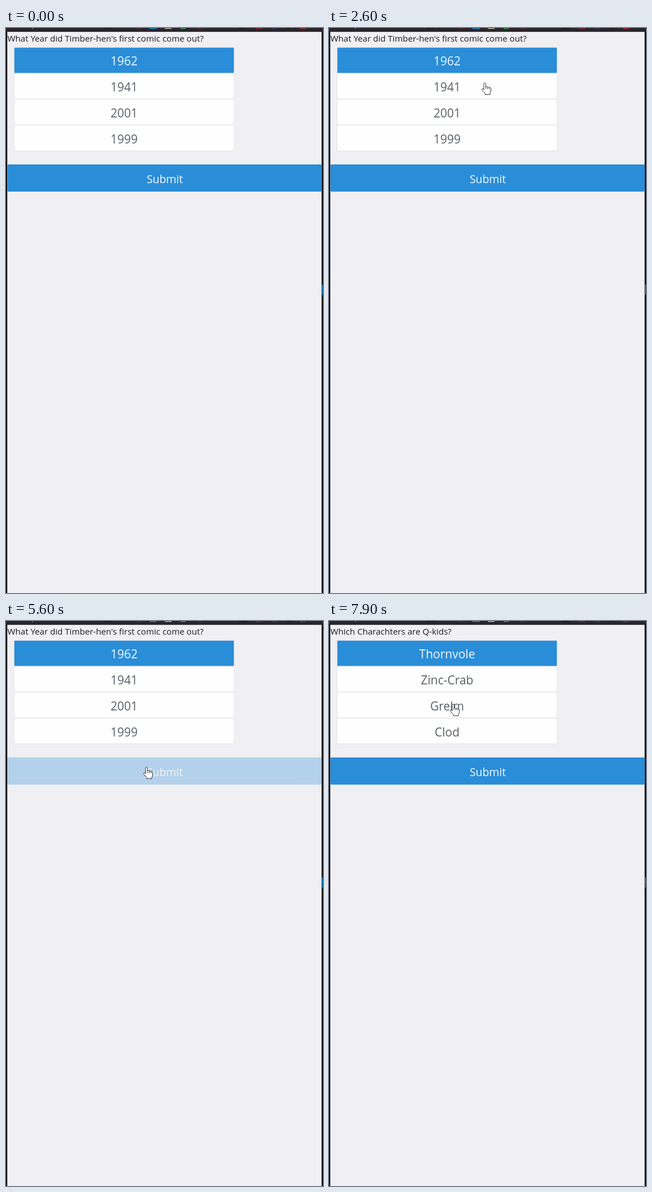
These frames come from a looping animation (561x998 px, 8000 ms). An HTML page:

```html
<!DOCTYPE html>
<html lang="en">
<head>
<meta charset="utf-8">
<title>Quiz</title>
<style>
  html, body { margin: 0; width: 100%; height: 100%; overflow: hidden; background: #f0eff3; }
  svg { display: block; width: 100vw; height: 100vh; }
  text { font-family: "Open Sans", "Noto Sans", sans-serif; }
  .answer { font-size: 21px; text-anchor: middle; }
</style>
</head>
<body>
<svg viewBox="0 0 561 998" xmlns="http://www.w3.org/2000/svg">
  <rect width="561" height="998" fill="#f0eff3"/>
  <g id="bar">
    <rect width="561" height="6.8" fill="#29252c"/>
  </g>
  <rect y="6" width="2.2" height="992" fill="#0c0b0d"/>
  <rect x="558.6" y="6" width="2.4" height="992" fill="#0c0b0d"/>
  <rect x="559" y="453" width="2" height="18" fill="#0b689c"/>
  <text id="question" x="2.5" y="24" font-size="15.1" fill="#1c1c20"></text>
  <rect x="14" y="34" width="390" height="183.5" rx="2" fill="#e0e0e4"/>
  <g id="answers"></g>
  <g id="submit">
    <rect x="2.4" y="241" width="556.4" height="48" rx="2" fill="#2a8dd8"/>
    <text x="281" y="273.8" font-size="19.4" text-anchor="middle" fill="#f6fafd">Submit</text>
  </g>
  <g id="cursor" fill="#fff" stroke="#35353b" stroke-width="1" stroke-linejoin="round">
    <path id="arrow" d="M0 0V14.5L3.4 11.5 6 17.4 8.6 16.2 6 10.6H10.4Z"/>
    <g id="hand">
      <path d="M-2 1.5Q-2 0 -.4 0T1.4 1.5V6.5Q3.5 5.6 4.6 7.2 6.6 6.4 7.7 8 10.4 7.4 10.6 10V14Q10.6 16 9 18V20.5H.2V18.6L-5 12.8Q-6.4 10.5 -4.6 10T-2 12Z"/>
      <path d="M1.4 6.5V10.5M4.6 7.2V11M7.7 8V11.2" fill="none"/>
    </g>
  </g>
</svg>
<script>
const NS = "http://www.w3.org/2000/svg";
const LOOP = 8000, STEP = 100;
const ROW_TOP = 34.8, ROW_HEIGHT = 45.7;
const byId = id => document.getElementById(id);

function add(parent, tag, attrs) {
  const node = document.createElementNS(NS, tag);
  for (const key in attrs) node.setAttribute(key, attrs[key]);
  return parent.appendChild(node);
}

const pages = [
  { question: "What Year did Timber-hen's first comic come out?",
    answers: ["1962", "1941", "2001", "1999"] },
  { question: "Which Charachters are Q-kids?",
    answers: ["Thornvole", "Zinc-Crab", "Grelm", "Clod"] }
];

// [start time, page, selected row]
const states = [[0, 0, 0], [3000, 0, 1], [4000, 0, 0], [5900, 1, -1], [7400, 1, 0]];

// [time, x, y] of the pointer tip
const route = [
  [2000, 566, 150], [2500, 276, 97], [3200, 276, 97], [3700, 229, 62], [4200, 229, 62],
  [4800, 249, 258], [5900, 249, 258], [6300, 233, 237], [6500, 233, 237],
  [7000, 226, 56], [7500, 226, 56], [7900, 220, 147]
];

// [time, opacity] of the submit button
const press = [[5500, 1], [5600, 0.3], [5700, 0.2], [5800, 0.2], [5900, 1]];

// [x, width, colour] of the clipped icons along the top edge
const icons = [
  [46, 2, "#77737a"], [173, 14, "#17151a"], [230, 11, "#542a30"], [254, 13, "#2687c6"],
  [281, 12, "#c9b58c"], [309, 9, "#37a43d"], [339, 8, "#68282b"], [412, 14, "#17151a"],
  [442, 11, "#8c2731"], [470, 9, "#35405a"], [497, 7, "#17151a"], [520, 11, "#a12d2b"]
];
for (const [x, width, fill] of icons) add(byId("bar"), "rect", { x, y: 0, width, height: 1.5, fill });

const rows = [0, 1, 2, 3].map(i => {
  const y = ROW_TOP + i * ROW_HEIGHT;
  return {
    box: add(byId("answers"), "rect", { x: 14.8, y, width: 388.4, height: ROW_HEIGHT - 1.2, rx: 1 }),
    label: add(byId("answers"), "text", { x: 209, y: y + 31.6, class: "answer" })
  };
});

const ease = u => u * u * (3 - 2 * u);

function sample(keys, t, shape) {
  if (t <= keys[0][0]) return keys[0].slice(1);
  const next = keys.findIndex(key => key[0] > t);
  if (next < 0) return keys[keys.length - 1].slice(1);
  const a = keys[next - 1], b = keys[next];
  const u = shape((t - a[0]) / (b[0] - a[0]));
  return a.slice(1).map((value, i) => value + (b[i + 1] - value) * u);
}

function render(t) {
  const [, pageIndex, selected] = states.filter(state => state[0] <= t).pop();
  const page = pages[pageIndex];
  byId("question").textContent = page.question;
  rows.forEach(({ box, label }, i) => {
    const active = i === selected;
    box.setAttribute("fill", active ? "#2a8dd8" : "#fefefe");
    label.setAttribute("fill", active ? "#f6fafd" : "#5a6066");
    label.textContent = page.answers[i];
  });

  byId("submit").setAttribute("opacity", sample(press, t, u => u)[0]);

  const [x, y] = sample(route, t, ease);
  const overList = x > 14 && x < 403 && y > 34 && y < 217;
  const clickable = overList || (y > 241 && y < 289);
  byId("cursor").setAttribute("transform", `translate(${x} ${y})`);
  byId("cursor").setAttribute("visibility", t < route[0][0] ? "hidden" : "visible");
  byId("hand").setAttribute("display", clickable ? "inline" : "none");
  byId("arrow").setAttribute("display", clickable ? "none" : "inline");
}

const start = performance.now();
function tick() {
  const t = (performance.now() - start) % LOOP;
  render(Math.floor(t / STEP) * STEP);
  requestAnimationFrame(tick);
}
tick();
</script>
</body>
</html>
```
